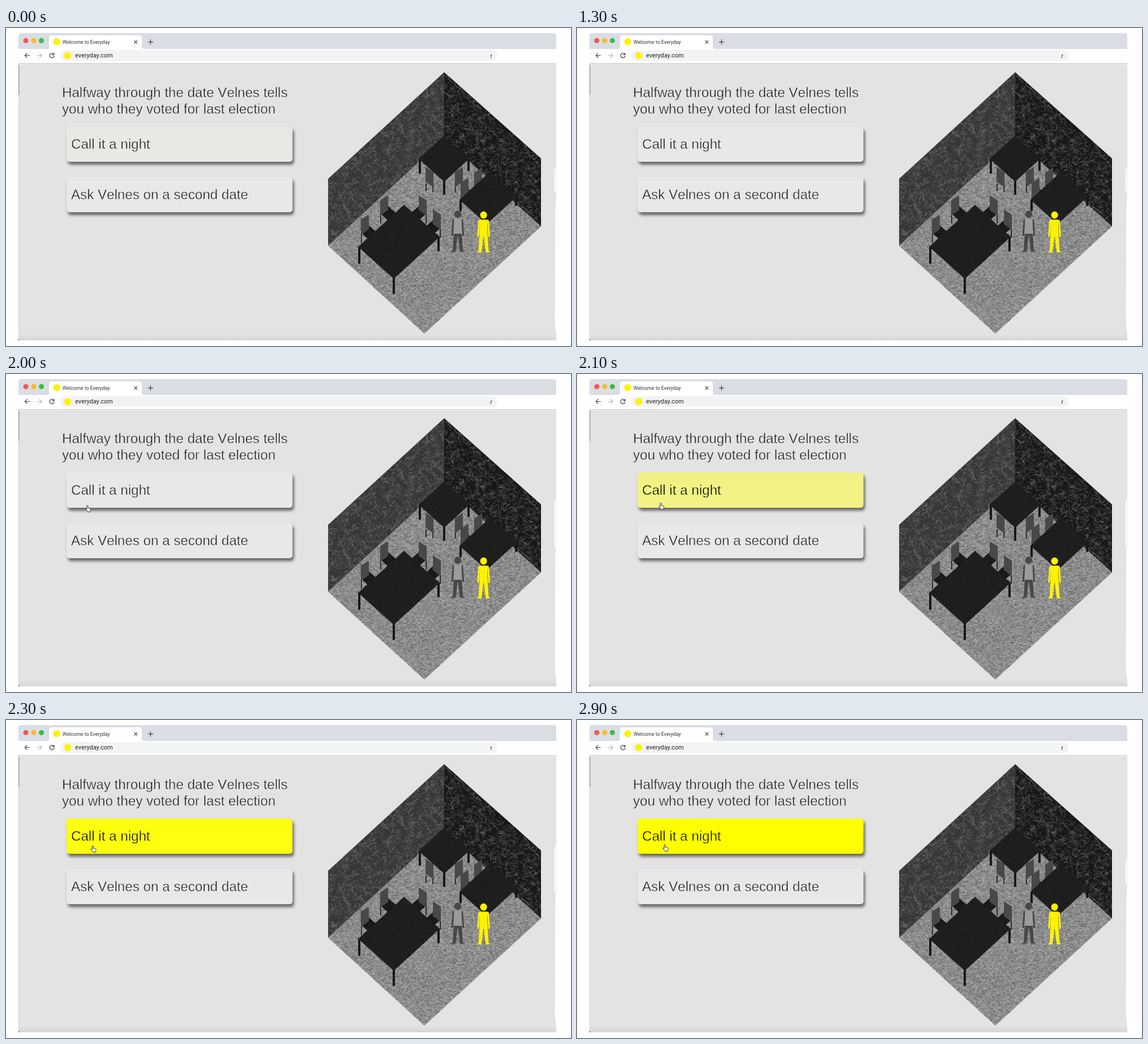
An HTML page with a canvas that plays this animation: 998 px wide and 561 px high, repeating every 3000 ms.

```html
<!DOCTYPE html>
<html lang="en">
<head>
<meta charset="utf-8">
<title>Welcome to Everyday</title>
<style>
  html, body { margin: 0; width: 100%; height: 100%; overflow: hidden; background: #fff; }
  #stage { position: relative; width: 998px; height: 561px; overflow: hidden; }
  #stage > * { position: absolute; }
  canvas, svg { left: 0; top: 0; }
  #page {
    left: 22px; top: 64px; width: 950px; height: 487px;
    background: linear-gradient(#e3e3e3 476px, #d6d6d6 487px);
  }
  .light {
    font: 24.15px "Liberation Sans", Arial, sans-serif;
    font-kerning: none; color: #1c1c1c; white-space: nowrap;
    -webkit-text-stroke: 0.55px var(--bg);
  }
  #question { --bg: #e3e3e3; left: 99px; top: 100.4px; line-height: 28.6px; }
  .choice {
    --bg: #e8e8ea; left: 107px; width: 391px; height: 62px; padding-left: 8px;
    line-height: 62px; border-radius: 5px; background: var(--bg);
    box-shadow: 2.5px 5px 5px rgba(0, 0, 0, .55);
  }
  .ui { font-family: Roboto, Arial, sans-serif; }
</style>
</head>
<body>
<div id="stage">
  <div id="page"></div>
  <canvas id="room" width="998" height="561"></canvas>

  <svg width="998" height="561" fill="none" stroke-linecap="round">
    <path d="M22 37V14q0-5 5-5H967q5 0 5 5V37z" fill="#dadde4"/>
    <circle cx="35" cy="22.3" r="4.5" fill="#f4574f"/>
    <circle cx="49" cy="22.3" r="4.5" fill="#f6bc30"/>
    <circle cx="62.5" cy="22.3" r="4.5" fill="#37bf43"/>
    <path d="M22 37H72q4 0 4-4V18q0-5 5-5H235q5 0 5 5V33q0 4 4 4H972V62H22z" fill="#fff"/>
    <circle cx="89.6" cy="24.2" r="6.2" fill="#fff200"/>
    <g stroke="#3c4043" stroke-width="1.2">
      <path d="M226.7 22.2l5 5m0-5l-5 5M251.3 24.7h8m-4-4v8"/>
      <path d="M41.5 48.5h-8m3.7-3.8l-3.8 3.8 3.8 3.8"/>
      <path d="M55 48.5h8m-3.7-3.8l3.8 3.8-3.8 3.8" stroke="#b3b6ba"/>
      <path d="M84.2 46a4 4 0 1 0 .8 3.5M84.9 44.5v2.7h-2.7"/>
    </g>
    <rect x="96" y="39" width="772" height="19" rx="9.5" fill="#f1f3f4"/>
    <circle cx="109" cy="48.6" r="6.2" fill="#fff200"/>
    <g class="ui" fill="#303236">
      <text x="100" y="27.5" font-size="8.8">Welcome to Everyday</text>
      <text x="122" y="52.3" font-size="10.9" fill="#202124">everyday.com</text>
      <text x="855.5" y="53" font-size="10.5">r</text>
    </g>
    <path d="M22 62.5H972" stroke="#c5c5c5"/>
    <path d="M22 63.6H967" stroke="#f0f0f0"/>
    <path d="M22.8 65V118" stroke="#777"/>
    <path d="M22.5 118V549" stroke="#c9c9c9" stroke-width=".7"/>
    <circle cx="22.5" cy="550" r="1" fill="#555"/>
    <path d="M972 295L970.3 320 969.6 520 972 540z" fill="#fff"/>
    <rect id="edge" x="968.5" width="5" rx="2.5" fill="#f7f7f7"/>
  </svg>

  <div id="question" class="light">Halfway through the date Velnes tells<br>you who they voted for last election</div>
  <div id="leave" class="light choice" style="top:174px">Call it a night</div>
  <div class="light choice" style="top:263px">Ask Velnes on a second date</div>

  <svg width="998" height="561">
    <path id="hand" fill="#fff" stroke="#222" stroke-width=".9" stroke-linejoin="round"
      d="M-2.2 -4.7a1 1 0 0 1 2 0V-1.4l3.2 .6q1.4 .3 1.4 1.6V2q0 1.3-.8 2.5V5.7H-.8V4.8L-4.2 1.3q-.5-1 .5-1.3l1.5 1z"/>
  </svg>
</div>

<script>
const $ = id => document.getElementById(id);
const g = $('room').getContext('2d');

let seed = 7;
function rnd() {
  seed = (seed * 16807) % 2147483647;
  return seed / 2147483647;
}

// Room axes: a runs up to the right, b down to the right
const iso = (x, y, a, b) => [x + a + b, y - 0.915 * a + 0.895 * b];

function slab(x, y, a, b) {
  return [[x, y], iso(x, y, a, 0), iso(x, y, a, b), iso(x, y, 0, b)];
}

function outline(pts) {
  g.beginPath();
  pts.forEach(p => g.lineTo(...p));
  g.closePath();
}

// Fills a polygon, then clips to it while its texture is drawn
function textured(pts, fill, draw) {
  const xs = pts.map(p => p[0]), ys = pts.map(p => p[1]);
  const x0 = Math.min(...xs), y0 = Math.min(...ys);
  const w = Math.max(...xs) - x0, h = Math.max(...ys) - y0;
  g.save();
  outline(pts);
  g.fillStyle = fill;
  g.fill();
  g.clip();
  draw(() => [x0 + rnd() * w, y0 + rnd() * h], w * h);
  g.restore();
}

// Short dotted strokes following a swirling field
function swirls(ink) {
  return (spot, area) => {
    g.strokeStyle = ink;
    g.lineWidth = 0.8;
    g.setLineDash([1.6, 1.2]);
    for (let i = 0; i < area / 13; i++) {
      let [x, y] = spot();
      g.beginPath();
      g.moveTo(x, y);
      for (let k = 0; k < 3; k++) {
        const a = 2.4 * Math.sin(x / 9 + Math.sin(y / 11)) + 2 * Math.cos(y / 9 - x / 23);
        x += 1.9 * Math.cos(a);
        y += 1.9 * Math.sin(a);
        g.lineTo(x, y);
      }
      g.stroke();
    }
  };
}

function dashes(inks, density, size) {
  return (spot, area) => {
    g.lineWidth = 0.8;
    for (let i = 0; i < area * density; i++) {
      const [x, y] = spot();
      const a = 0.15 + 0.4 * Math.sin(x / 17 + y / 23), len = size * (0.6 + rnd());
      g.strokeStyle = inks[i % inks.length];
      g.beginPath();
      g.moveTo(x, y);
      g.lineTo(x + len * Math.cos(a), y + len * Math.sin(a));
      g.stroke();
    }
  };
}

function leg(x, y, h, w) {
  g.fillStyle = '#171717';
  g.fillRect(x - w / 2, y, w, h);
}

// x, y is the left corner of the top
function table(x, y, a, b, h) {
  const top = slab(x, y, a, b), [left, , right, front] = top;
  leg(left[0] + 2, left[1], h, 4);
  leg(right[0] - 2, right[1], h * 0.85, 4);
  leg(front[0], front[1] - 3, h, 4);
  textured(top, '#1e1e1e', dashes(['#2b2b2b', '#171717'], 0.12, 1.5));
}

// x, y is the outer top corner of the back; s points towards the seat
function chair(x, y, s, seat = true) {
  g.save();
  g.translate(x, y);
  g.scale(s, 1);
  leg(0.8, 26, seat ? 15 : 10, 1.6);
  leg(13, 20, seat ? 22 : 14, 1.6);
  if (seat) {
    leg(26, 23, 10, 1.6);
    textured(slab(0, 23, 14, 14), '#191919', dashes(['#333', '#111'], 0.12, 1.5));
  }
  textured([[0, 0], [14, -9], [14, 17], [0, 27]], '#595959', () => {
    g.fillStyle = '#343434';
    for (let d = 0; d < 14; d += 2) g.fillRect(d, -10, 0.9, 40);
  });
  g.restore();
}

function person(x, y, limbs, torso) {
  g.save();
  g.translate(x, y);
  g.fillStyle = g.strokeStyle = limbs;
  g.beginPath();
  g.ellipse(0, 6.5, 6.1, 6.4, 0, 0, 7);
  g.fill();
  for (const s of [-1, 1]) {
    g.save();
    g.scale(s, 1);
    g.lineCap = 'round';
    g.lineWidth = 3;
    g.beginPath();
    g.moveTo(7.8, 16.5);
    g.lineTo(9.8, 43.5);
    g.stroke();
    outline([[0, 39], [7, 39], [8.8, 69.5], [12.6, 72.5], [3.8, 72.5], [0.6, 46], [0, 45]]);
    g.fill();
    g.restore();
  }
  outline([[-6.5, 14.5], [6.5, 14.5], [7.2, 41], [-7.2, 41]]);
  g.fillStyle = torso;
  g.fill();
  g.restore();
}

function drawRoom() {
  const peak = [774, 78], corner = [774, 195], west = [569, 384], east = [945, 350];
  textured([corner, east, [739, 539], west], '#868686',
    dashes(['#aaa', '#b4b4b4', '#5f5f5f'], 0.24, 2.4));
  textured([peak, corner, west, [569, 266]], '#373737', swirls('#767676'));
  textured([peak, [945, 230], east, corner], '#181818', swirls('#707070'));

  for (const s of [1, -1]) {
    chair(774 + 19 * s, 254, s, false);
    chair(702 - 41 * s, 304, s);
    chair(697.5 - 70.5 * s, 333.5 + 4.5 * s, s);
  }
  chair(827, 255, 1);
  chair(803, 273, 1);

  table(729, 231, 45, 45, 26);
  table(801, 303, 54, 48, 20);
  table(622, 386, 81, 63, 30);

  person(798, 322, '#474747', '#9b9b9b');
  person(843.6, 323.5, '#fff200', '#fff200');
}

const easeOut = u => 1 - (1 - Math.min(u, 1)) ** 2;
const mix = (a, b, p) => a + (b - a) * p;

function frame(now) {
  const t = Math.floor((now % 3000) / 100) * 100;

  // Hover colour: a trace of the last pass, then a fresh fade
  const hover = t < 900 ? 0.02 : t < 2000 ? 0 : easeOut((t - 2000) / 400);
  const warm = mix(232, 255, hover), blue = mix(234, 0, hover);
  $('leave').style.setProperty('--bg', `rgb(${warm}, ${warm}, ${blue})`);
  $('leave').style.color = hover > 0.1 ? '#000' : '';

  const move = easeOut((t - 2000) / 500);
  $('hand').style.display = t < 1900 ? 'none' : '';
  $('hand').setAttribute('transform',
    `translate(${mix(145, 156.3, move)} ${mix(237.5, 225.6, move)})`);

  const tall = t >= 2000 && t < 2800;
  $('edge').setAttribute('y', tall ? 222 : 248);
  $('edge').setAttribute('height', tall ? 83 : 42);
  requestAnimationFrame(frame);
}

drawRoom();
frame(0);
</script>
</body>
</html>
```
